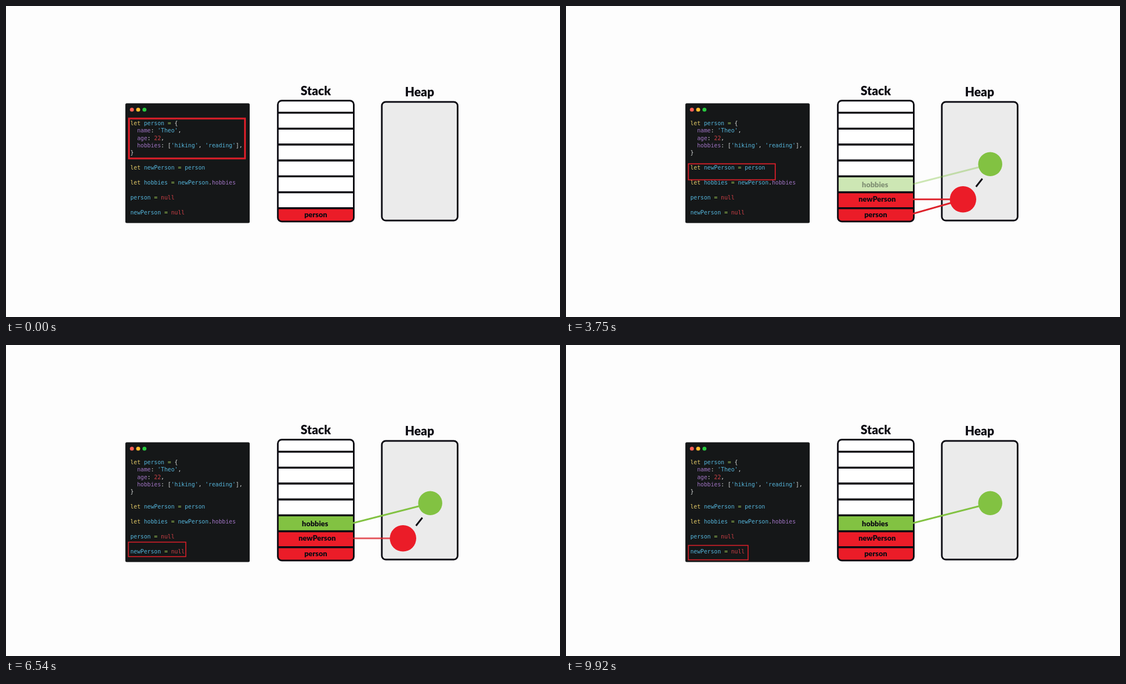
An HTML page with a canvas that plays this animation: 998 px wide and 561 px high, repeating every 9.96 s.

```html
<!DOCTYPE html>
<html lang="en">
<head>
<meta charset="utf-8">
<title>Stack and heap</title>
<style>
  html, body { margin: 0; width: 100%; height: 100%; overflow: hidden; background: #fdfdfd; }
  canvas { display: block; width: 998px; height: 561px; }
</style>
</head>
<body>
<canvas id="stage" width="998" height="561"></canvas>
<script>
const ctx = document.getElementById('stage').getContext('2d');
const LOOP = 9960, FADE = 665;
const INK = '#0b0a12', RED = '#eb1c28', LINE_RED = '#dd222b', GREEN = '#82c242';

// Start times of the six slide transitions
const STARTS = [850, 2167, 3487, 4807, 6127, 7600];

// Highlight poses: left, top, right, bottom, line width
const BOXES = [
  [221.5, 203, 430.5, 275, 3.2],
  [220.5, 278.5, 362.5, 306.5, 1.8],
  [220.5, 303, 420, 334.5, 1.8],
  [220.5, 334, 309, 360.5, 1.6],
  [220.5, 361.5, 328, 387.5, 1.6]
];

const COLORS = { y: '#e6cd69', b: '#55b5db', g: '#9fca56', p: '#a074c4', r: '#cd3f45', w: '#d4d7d6' };

// Each code line: row, then colour key and text in turn
const CODE = [
  [0, 'y', 'let ', 'b', 'person ', 'g', '= ', 'w', '{'],
  [1, 'p', '  name', 'w', ': ', 'b', "'Theo'", 'w', ','],
  [2, 'p', '  age', 'w', ': ', 'r', '22', 'w', ','],
  [3, 'p', '  hobbies', 'w', ': [', 'b', "'hiking'", 'w', ', ', 'b', "'reading'", 'w', '],'],
  [4, 'w', '}'],
  [6, 'y', 'let ', 'b', 'newPerson ', 'g', '= ', 'b', 'person'],
  [8, 'y', 'let ', 'b', 'hobbies ', 'g', '= ', 'b', 'newPerson', 'w', '.', 'p', 'hobbies'],
  [10, 'b', 'person ', 'g', '= ', 'r', 'null'],
  [12, 'b', 'newPerson ', 'g', '= ', 'r', 'null']
];

const clamp = v => Math.min(1, Math.max(0, v));
const ease = t => t < 0.5 ? 4 * t ** 3 : 1 - 4 * (1 - t) ** 3;

function roundRect(x, y, w, h, r) {
  ctx.beginPath();
  ctx.roundRect(x, y, w, h, r);
}

function circle(x, y, r, color) {
  ctx.fillStyle = color;
  ctx.beginPath();
  ctx.arc(x, y, r, 0, Math.PI * 2);
  ctx.fill();
}

function line(x1, y1, x2, y2, color, width = 3) {
  ctx.strokeStyle = color;
  ctx.lineWidth = width;
  ctx.beginPath();
  ctx.moveTo(x1, y1);
  ctx.lineTo(x2, y2);
  ctx.stroke();
}

function label(text, x, y, size) {
  ctx.font = `900 ${size}px Lato, sans-serif`;
  ctx.textAlign = 'center';
  ctx.fillStyle = INK;
  ctx.fillText(text, x, y);
}

function withAlpha(alpha, draw) {
  if (alpha <= 0) return;
  ctx.save();
  ctx.globalAlpha = alpha;
  draw();
  ctx.restore();
}

function drawEditor() {
  ctx.fillStyle = '#151718';
  roundRect(215, 175.5, 224, 216, 2.5);
  ctx.fill();
  ['#ff5f56', '#ffbd2e', '#27c93f'].forEach((c, i) => circle(226.8 + i * 11.3, 187, 3.6, c));
  ctx.font = '10.18px "DejaVu Sans Mono", monospace';
  ctx.textAlign = 'left';
  for (const [row, ...parts] of CODE) {
    let x = 224;
    for (let i = 0; i < parts.length; i += 2) {
      ctx.fillStyle = COLORS[parts[i]];
      ctx.fillText(parts[i + 1], x, 214.7 + row * 13.44);
      x += ctx.measureText(parts[i + 1]).width;
    }
  }
}

function drawHighlight(progress) {
  let pose = BOXES[0];
  for (let i = 1; i < BOXES.length; i++) {
    const k = ease(progress[i]);
    pose = pose.map((v, j) => v + (BOXES[i][j] - v) * k);
  }
  const [left, top, right, bottom, width] = pose;
  ctx.strokeStyle = '#db1f29';
  ctx.lineWidth = width;
  ctx.strokeRect(left, top, right - left, bottom - top);
}

function cell(y, h, color, text, textX, textY) {
  ctx.fillStyle = color;
  ctx.fillRect(490, y, 136, h);
  label(text, textX, textY, 13.3);
}

function drawStack(showNew, showHobbies) {
  label('Stack', 558, 161, 22);
  ctx.save();
  roundRect(489.7, 170.7, 136.8, 218, 7);
  ctx.fillStyle = '#fff';
  ctx.fill();
  ctx.clip();
  cell(364.7, 26, RED, 'person', 558, 380.5);
  withAlpha(showNew, () => cell(336, 28.7, RED, 'newPerson', 560.5, 353));
  withAlpha(showHobbies, () => cell(307.3, 28.7, GREEN, 'hobbies', 556.7, 326.5));
  ctx.restore();
  for (let i = 0; i < 7; i++) {
    const y = 192.5 + i * 28.7;
    line(490, y, 626, y, INK, 3.6);
  }
  ctx.strokeStyle = INK;
  ctx.lineWidth = 3;
  roundRect(489.7, 170.7, 136.8, 218, 7);
  ctx.stroke();
}

function drawHeap() {
  label('Heap', 745, 163, 22);
  roundRect(677, 173, 136.6, 214, 7);
  ctx.fillStyle = '#ebebeb';
  ctx.fill();
  ctx.strokeStyle = INK;
  ctx.lineWidth = 3;
  ctx.stroke();
}

function render(time) {
  const progress = STARTS.map(s => clamp((time - s) / FADE));
  const [objects, newPerson, hobbies, personNull, newNull, collect] = progress;
  const gone = t => 1 - t ** 3;

  ctx.fillStyle = '#fdfdfd';
  ctx.fillRect(0, 0, 998, 561);
  drawEditor();
  drawHighlight(progress);
  drawStack(newPerson, hobbies);
  drawHeap();

  withAlpha(objects * gone(personNull), () => line(624, 375, 695, 354.7, LINE_RED));
  withAlpha(newPerson * gone(newNull), () => line(614, 348.8, 694, 348.8, LINE_RED));
  withAlpha(hobbies, () => line(625, 321.2, 745, 290.5, GREEN));
  withAlpha(objects, () => circle(764.2, 285.3, 21.7, GREEN));
  withAlpha(objects * gone(collect), () => {
    circle(715.2, 348.8, 23.8, RED);
    line(738.6, 326, 750, 311.5, INK);
  });
}

function tick() {
  render(performance.now() % LOOP);
  requestAnimationFrame(tick);
}
tick();
</script>
</body>
</html>
```
